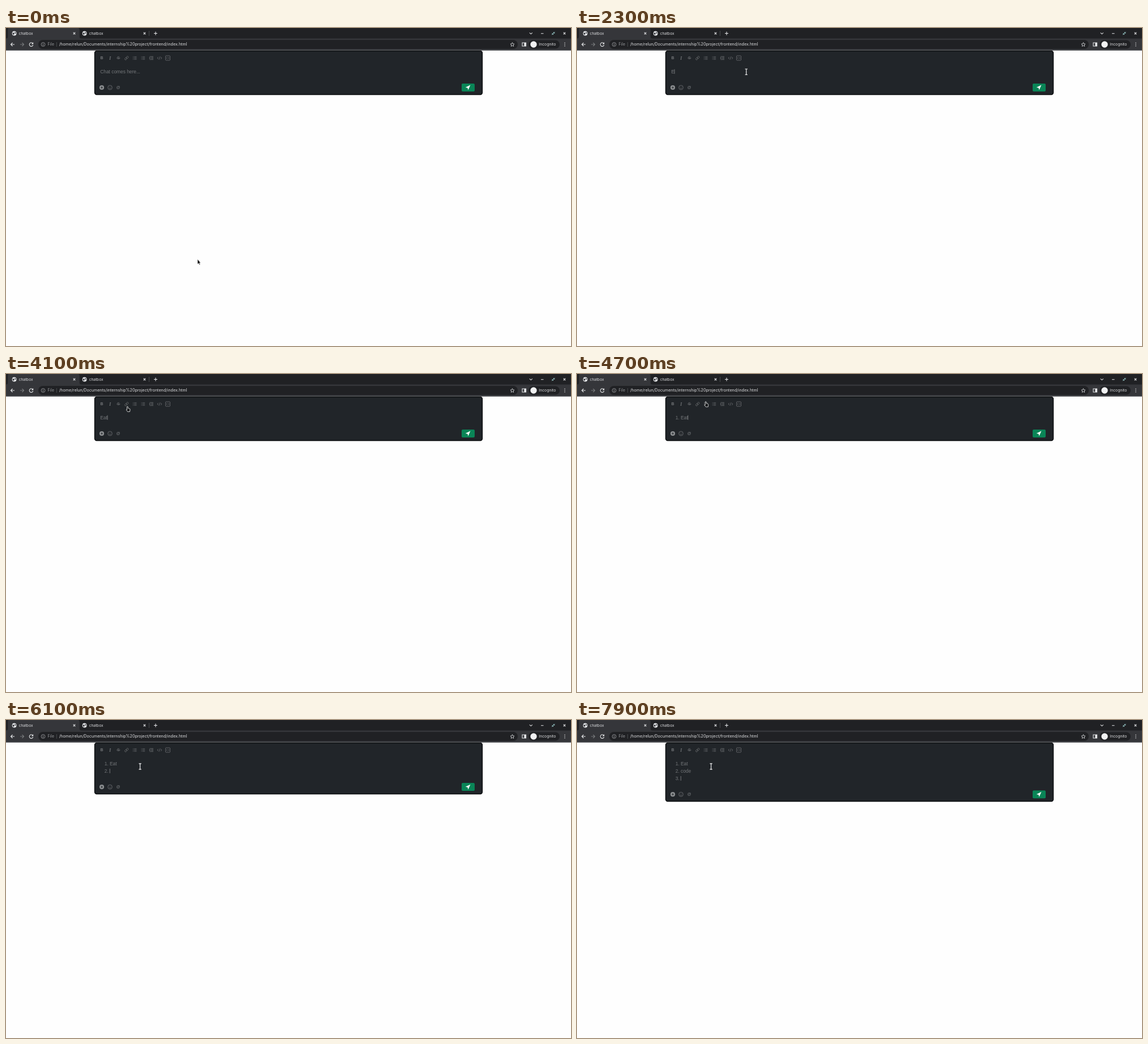
These frames come from a looping animation (997x561 px, 8 s). An HTML page:

```html
<!DOCTYPE html>
<html lang="en">
<head>
<meta charset="utf-8">
<title>chatbox</title>
<style>
  html, body { margin: 0; width: 100%; height: 100%; overflow: hidden; background: #fefefe; }
  svg { display: block; width: 997px; height: 561px; }
  .ui { font-family: Inter, Roboto, sans-serif; fill: #dcdddf; }
  .chat { font: 8.4px "Liberation Sans", Arial, sans-serif; fill: #74777a; white-space: pre; }
  .line { fill: none; stroke: #e4e5e7; stroke-width: 1.1; }
  .tool { fill: none; stroke: #686b6e; stroke-width: .85; }
</style>
</head>
<body>
<svg viewBox="0 0 997 561">
  <defs>
    <g id="globe">
      <circle r="3.9" fill="#e8eaed"/>
      <path d="M-2.8-1.6 0-.7.3 1-1 1.4-.8 3C-2.7 2.2-3.2.3-2.8-1.6M.6-2.8 2.8-1.6 2.6.7 1.2 0Z" fill="#35363a"/>
    </g>
    <path id="cross" d="M-1.8-1.8 1.8 1.8M1.8-1.8-1.8 1.8" class="line"/>
    <g id="list"><path d="M-1.4-2.2H3.2M-1.4 0H3.2M-1.4 2.2H3.2M-3.4-2.2H-2.3M-3.4 0H-2.3M-3.4 2.2H-2.3" class="tool"/></g>
  </defs>

  <rect width="997" height="561" fill="#fefefe"/>

  <!-- browser frame -->
  <rect width="997" height="39.5" fill="#35363a"/>
  <path d="M0 0H997V18.6H133Q129.500 18.600 129.500 15V3Q129.500 0 126 0H6Q3.500 0 3.500 3V15Q3.500 18.600 0 18.600Z" fill="#202124"/>
  <path d="M6 0H126Q129.500 0 129.500 3V15Q129.500 18.600 133 18.600H0Q3.500 18.600 3.500 15V3Q3.500 0 6 0Z" fill="#35363a"/>
  <rect y="38.700" width="997" height=".9" fill="#55575a"/>
  <rect x="57" y="21" width="846" height="16" rx="8" fill="#202124"/>
  <rect x="922" y="21.500" width="55" height="15" rx="7.500" fill="#202124"/>
  <path d="M252.500 5V14" stroke="#55575a" stroke-width=".8"/>
  <use href="#globe" x="14.600" y="9.500"/>
  <use href="#globe" x="138.600" y="9.500"/>
  <use href="#cross" x="120.500" y="9.500"/>
  <use href="#cross" x="244.500" y="9.500"/>
  <path d="M261 9.500H267M264 6.500V12.500" class="line"/>
  <path d="M15 29H8.500M11.500 26 8.500 29 11.500 32" class="line"/>
  <path d="M25 29H31.500M28.500 26 31.500 29 28.500 32" class="line" style="stroke:#77797c"/>
  <path d="M47.300 27.300A3.300 3.300 0 1 0 47.700 30" class="line"/>
  <path d="M48.200 25V28.400H44.800Z" fill="#e4e5e7"/>
  <circle cx="65.500" cy="29" r="3.400" class="line" style="stroke:#a6a8ab;stroke-width:.8"/>
  <path d="M65.500 28.500V31M65.500 27V27.800" class="line" style="stroke:#a6a8ab;stroke-width:.9"/>
  <path d="M89.300 25V33" stroke="#55575a" stroke-width=".8"/>
  <path d="M893.500 25.600 894.500 27.900 897 28.200 895.200 29.900 895.700 32.300 893.500 31.100 891.300 32.300 891.800 29.900 890 28.200 892.500 27.900Z" class="line" style="stroke-width:.8"/>
  <path d="M911 26H917.500V32H911Z" class="line"/>
  <rect x="914.300" y="26" width="3.200" height="6" fill="#e4e5e7"/>
  <circle cx="931" cy="29" r="5.700" fill="#f1f2f3"/>
  <g fill="#d4d5d7"><circle cx="986" cy="26.300" r=".8"/><circle cx="986" cy="29" r=".8"/><circle cx="986" cy="31.700" r=".8"/></g>
  <path d="M923.800 8.300 926.300 10.600 928.800 8.300M944 9.800H948.500" class="line"/>
  <path d="M966.300 7V9.100H968.400M965.300 12V9.900H963.200M966.300 9.100 968.500 6.900M965.300 9.900 963.100 12.100" class="line" style="stroke:#a5dcdc;stroke-width:.9"/>
  <use href="#cross" x="985.500" y="9.500"/>
  <g class="ui">
    <text x="22.700" y="11.900" font-size="6.550">chatbox</text>
    <text x="146.700" y="11.900" font-size="6.550">chatbox</text>
    <text x="73.500" y="31.400" font-size="6.900" fill="#96989b" style="fill:#96989b">File</text>
    <text x="93.800" y="31.400" font-size="7.130">/home/relun/Documents/internship%20project/frontend/index.html</text>
    <text x="940.300" y="31.400" font-size="6.850">Incognito</text>
  </g>

  <!-- editor -->
  <rect id="box" x="156.500" y="40.500" width="684" height="77" rx="3.500" fill="#212529" stroke="#0b0d0f" stroke-width="1.400"/>
  <g font-family="Liberation Serif, serif" font-size="7.500" font-weight="bold" fill="#74777a" text-anchor="middle">
    <text x="169" y="55.400" font-family="Liberation Sans, sans-serif" font-size="7">B</text>
    <text x="183.700" y="55.500" font-style="italic">I</text>
    <text x="198.300" y="55.400" font-family="Liberation Sans, sans-serif" font-size="7" font-weight="normal">S</text>
  </g>
  <path d="M195 53H201.600" class="tool"/>
  <g transform="translate(212.700 53) rotate(-45)" class="tool">
    <rect x="-3.900" y="-1.500" width="4.300" height="3" rx="1.500"/><rect x="-.4" y="-1.500" width="4.300" height="3" rx="1.500"/>
  </g>
  <use href="#list" x="227.300" y="53"/>
  <use href="#list" x="242" y="53"/>
  <path d="M253.300 50.300H260M256 52.100H260M256 53.900H260M253.300 55.700H260M253.300 51.800 255 53 253.300 54.200Z" class="tool"/>
  <path d="M269 51 267 53 269 55M273 51 275 53 273 55M271.800 50.300 270.200 55.700" class="tool"/>
  <rect x="281.500" y="49" width="8" height="8" rx="1" class="tool"/>
  <path d="M284.500 51.500 283.200 53 284.500 54.500M286.500 51.500 287.800 53 286.500 54.500" class="tool"/>

  <g id="foot">
    <circle cx="169" cy="105" r="4.100" fill="#8b8e90"/>
    <path d="M167 105H171M169 103V107" stroke="#212529" stroke-width=".9"/>
    <circle cx="183.500" cy="105" r="3.900" class="tool"/>
    <path d="M181.500 106Q183.500 108 185.500 106M182 103.300V104.300M185 103.300V104.300" class="tool"/>
    <text x="198" y="107.300" text-anchor="middle" font-family="Liberation Sans, sans-serif" font-size="7" fill="#74777a">@</text>
    <rect x="804" y="98" width="23" height="14" rx="2" fill="#0a8557"/>
    <path d="M819.500 100.600 810.800 104.700 814.600 105.700 815.500 109.600Z" fill="#fff"/>
  </g>

  <g id="copy" class="chat"></g>
  <rect id="caret" width=".8" height="8" fill="#8b8e90"/>

  <!-- pointers -->
  <path id="arrow" d="M0 0V8.600L1.900 6.900 3.200 9.800 4.500 9.200 3.200 6.400H5.500Z" fill="#0a0a0a" stroke="#e8e8e8" stroke-width=".6"/>
  <g id="beam" fill="none">
    <path d="M-2.100-5H-.6L0-4.500.6-5H2.100M-2.100 5H-.6L0 4.500.6 5H2.100M0-4.500V4.500" stroke="#dfe0e1" stroke-width="1.300"/>
  </g>
  <path id="hand" d="M-2.300-4.500Q-1.400-5.400-.7-4.500L-.2-1.500 2.200-1Q3.400-.6 3.200 1L2.600 4.500H-1.300L-3.500 1.400Q-3.600.1-2.300.8Z" fill="#17191b" stroke="#e4e5e6" stroke-width=".85"/>
</svg>

<script>
const LOOP = 8000, STEP = 100;
const $ = id => document.getElementById(id);

// time, x, y of the pointer
const path = [
  [0, 338, 408], [400, 338, 408], [500, 344, 385], [600, 352, 310], [700, 350, 222],
  [800, 316, 157], [900, 308.5, 111.5], [1000, 303, 95], [1200, 299, 79], [1400, 298.7, 78],
  [1600, 298.7, 77.4], [3600, 298.7, 77.4], [3800, 289, 75], [4000, 241, 66], [4100, 215.800, 62],
  [4300, 227, 53.500], [4800, 229, 53.500], [5000, 234, 71], [5300, 236.600, 80], [5700, 236.600, 82]
];
const shapes = [[0, "arrow"], [1000, "beam"], [4000, "hand"], [4900, "beam"]];

// time, content, caret shown, numbered list
const edits = [
  [0, null, 0], [1300, null, 1], [1900, null, 0],
  [2300, ["E"], 1], [2600, ["Ea"], 1], [2800, ["Eat"], 1], [3400, ["Eat"], 0],
  [3900, ["Eat"], 1], [4400, ["Eat"], 0],
  [4700, ["Eat"], 1, 1], [5200, ["Eat"], 0, 1], [6100, ["Eat", ""], 1, 1],
  [6600, ["Eat", "c"], 1, 1], [6700, ["Eat", "co"], 1, 1], [6800, ["Eat", "cod"], 1, 1],
  [7000, ["Eat", "code"], 1, 1], [7200, ["Eat", "code "], 1, 1], [7700, ["Eat", "code "], 0, 1],
  [7800, ["Eat", "code", ""], 1, 1]
];

const pen = document.createElement("canvas").getContext("2d");
pen.font = '84px "Liberation Sans", Arial, sans-serif';
const widthOf = s => pen.measureText(s).width / 10;
const current = (table, t) => table.findLast(row => row[0] <= t);

function addText(s, x, y, anchor = "start") {
  const el = document.createElementNS("http://www.w3.org/2000/svg", "text");
  el.setAttribute("x", x);
  el.setAttribute("y", y);
  el.setAttribute("text-anchor", anchor);
  el.textContent = s;
  $("copy").append(el);
}

function pointAt(t) {
  const i = path.findLastIndex(p => p[0] <= t);
  const a = path[i], b = path[i + 1] || a;
  const k = a === b ? 0 : (t - a[0]) / (b[0] - a[0]);
  return [a[1] + (b[1] - a[1]) * k, a[2] + (b[2] - a[2]) * k];
}

let shown;
function drawEditor(edit) {
  if (edit === shown) return;
  shown = edit;
  const [, content, caret, numbered] = edit;
  const lines = content || [""];
  const left = numbered ? 183 : 166.2;
  const last = lines.length - 1;
  $("copy").replaceChildren();
  if (!content) addText("Chat comes here...", left, 79.600);
  lines.forEach((line, i) => {
    const y = 79.600 + 13.100 * i;
    if (numbered) addText(i + 1 + ".", 180.800, y, "end");
    addText(line, left, y);
  });
  $("caret").setAttribute("x", left + widthOf(lines[last]) - .2);
  $("caret").setAttribute("y", 72.800 + 13.100 * last);
  $("caret").style.opacity = caret;
  $("box").setAttribute("height", 77 + 13 * last);
  $("foot").setAttribute("transform", `translate(0 ${13.100 * last})`);
}

function draw(now) {
  const t = Math.floor((now % LOOP) / STEP) * STEP;
  drawEditor(current(edits, t));
  const [x, y] = pointAt(t), kind = current(shapes, t)[1];
  for (const id of ["arrow", "beam", "hand"]) {
    $(id).style.display = id === kind ? "" : "none";
    $(id).setAttribute("transform", `translate(${x} ${y})`);
  }
}

const start = performance.now();
function tick() {
  draw(performance.now() - start);
  requestAnimationFrame(tick);
}
tick();
</script>
</body>
</html>
```
